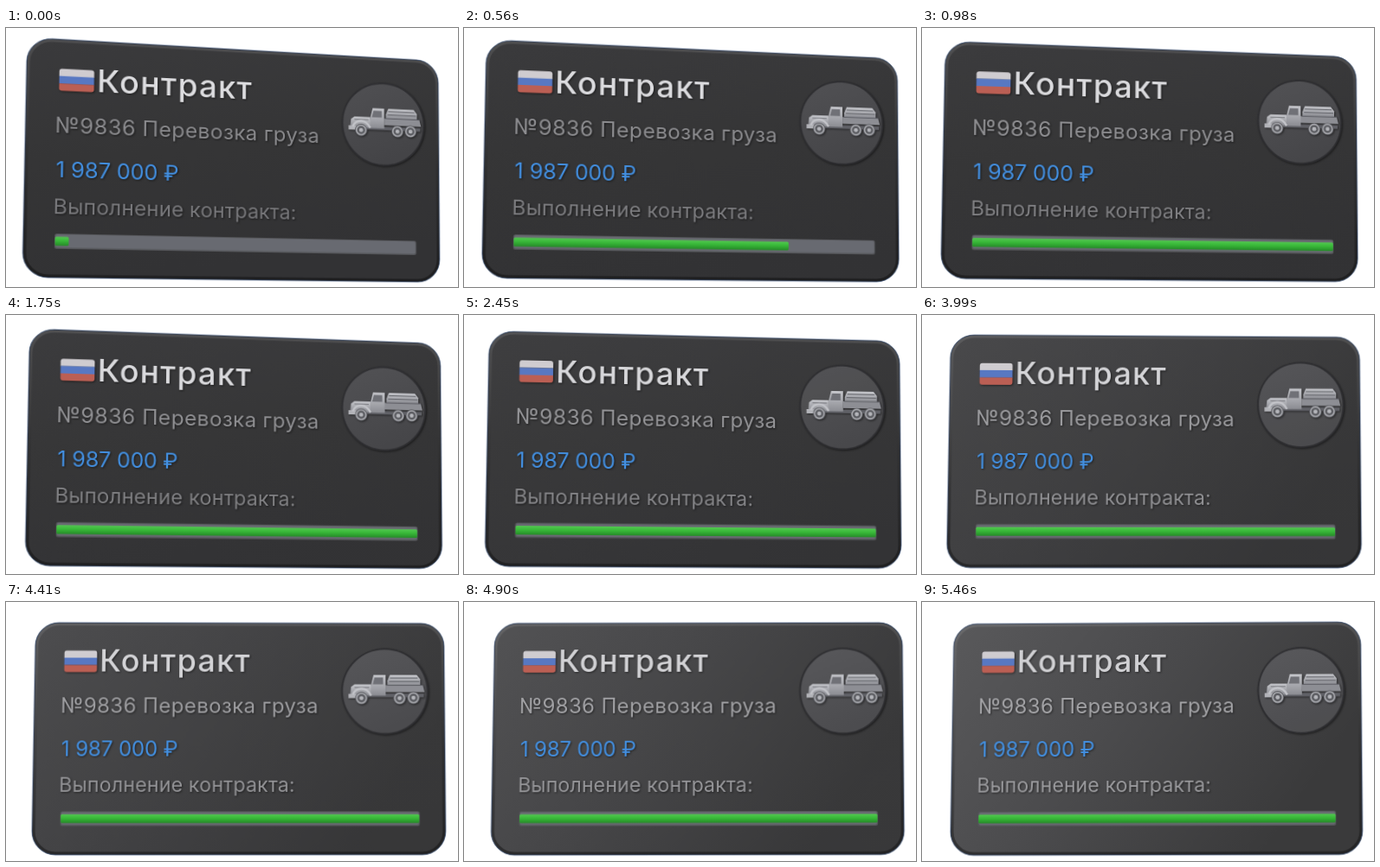
Write an HTML page that moves like this. It is 522 px wide and 300 px high and loops after 8000 ms.

```html
<!DOCTYPE html>
<html lang="ru">
<head>
<meta charset="utf-8">
<style>
  html, body { margin: 0; width: 100%; height: 100%; overflow: hidden; background: #fff; }
  #card { position: absolute; left: 0; top: 0; width: 472px; height: 268px; overflow: visible; transform-origin: 0 0; }
  text { font-family: Inter, "Open Sans", sans-serif; }
  .raised { filter: drop-shadow(1px 1.5px 1px rgba(0, 0, 0, .5)); }
</style>
</head>
<body>
<svg id="card" viewBox="0 0 472 268">
  <defs>
    <linearGradient id="base" x2=".2" y2="1">
      <stop offset="0" stop-color="#3a3a3c"/>
      <stop offset=".5" stop-color="#353536"/>
      <stop offset="1" stop-color="#323234"/>
    </linearGradient>
    <linearGradient id="lit" x2="1" y2=".4">
      <stop offset="0" stop-color="#59595b"/>
      <stop offset=".45" stop-color="#4c4c4e"/>
      <stop offset="1" stop-color="#3a3a3b"/>
    </linearGradient>
    <linearGradient id="rim" x2="0" y2="1">
      <stop offset="0" stop-color="#fff" stop-opacity=".1"/>
      <stop offset=".5" stop-color="#000" stop-opacity=".1"/>
      <stop offset="1" stop-color="#000" stop-opacity=".4"/>
    </linearGradient>
    <linearGradient id="disc" x2=".4" y2="1">
      <stop offset="0" stop-color="#505053"/>
      <stop offset="1" stop-color="#444447"/>
    </linearGradient>
    <linearGradient id="green" x2="0" y2="1">
      <stop offset="0" stop-color="#52c850"/>
      <stop offset=".45" stop-color="#38b838"/>
      <stop offset="1" stop-color="#258a28"/>
    </linearGradient>
    <linearGradient id="metal" x2="0" y2="1">
      <stop offset="0" stop-color="#c6c7cc"/>
      <stop offset="1" stop-color="#8b8c92"/>
    </linearGradient>
    <clipPath id="flag"><rect x="33.4" y="32.4" width="37.6" height="25.2" rx="3"/></clipPath>
    <g id="wheel">
      <circle r="7.3" fill="#5c5d62"/>
      <circle r="5.6" fill="none" stroke="#a6a7ac" stroke-width="1.6"/>
      <circle r="2.4" fill="#b3b4b9"/>
    </g>
  </defs>

  <rect width="472" height="268" rx="27" fill="url(#base)"/>
  <rect id="light" width="472" height="268" rx="27" fill="url(#lit)"/>
  <rect x="2" y="2" width="468" height="264" rx="25" fill="none" stroke="url(#rim)" stroke-width="3"/>
  <rect width="472" height="268" rx="27" fill="none" stroke="#28436d" stroke-opacity=".7"/>

  <g id="content">
    <g class="raised"><g clip-path="url(#flag)">
      <path d="M32 32h40v9H32z" fill="#cfccd0"/>
      <path d="M32 40.8h40v8.6H32z" fill="#5878c2"/>
      <path d="M32 49.2h40v9H32z" fill="#bb5f54"/>
    </g></g>

    <g class="raised">
      <text id="title" x="74" y="57" font-size="36" font-weight="500" letter-spacing="1.2">Контракт</text>
      <text id="job" x="29.8" y="105" font-size="24" letter-spacing=".35">№9836 Перевозка груза</text>
      <text x="31.5" y="155" font-size="24" letter-spacing="-.2" fill="#4390e2">1 987 000 ₽</text>
      <text id="label" x="29.5" y="196" font-size="23" letter-spacing=".15">Выполнение контракта:</text>
    </g>

    <rect x="31.5" y="218" width="410.5" height="17" rx="2.5" fill="#55565a"/>
    <rect x="32.5" y="219" width="408.5" height="14.5" rx="2" fill="#686a71"/>
    <rect id="bar" x="32" y="221.5" height="10" rx="1.5" fill="url(#green)"/>

    <g transform="translate(402.8 79.4)">
      <circle class="raised" r="50.3" fill="#303033"/>
      <circle r="49.3" fill="url(#disc)"/>
      <circle id="glow" r="49.3" fill="#fff"/>
      <circle r="49" fill="none" stroke="#29292b" stroke-opacity=".7" stroke-width="1.5"/>
      <g class="raised">
        <path d="M-41 3h86v4h-86z" fill="#606167"/>
        <path d="M1-7h43l2 8H1z" fill="#8d8e94"/>
        <path d="M3-12 6-19H37l4 5v7H3z" fill="url(#metal)"/>
        <path d="M6-15.5H38M5-11.5H40M2-7H44" stroke="#5e5f65" fill="none"/>
        <path d="M-16-7-13-19H1V5H-17z" fill="url(#metal)"/>
        <path d="M-12-16h10v8h-12z" fill="#707177"/>
        <path d="M-39-5-35-8-16-8V5H-40z" fill="url(#metal)"/>
        <path d="M-35-4.5h17" stroke="#74757b" fill="none"/>
        <path d="M-42 3h9v5h-9z" fill="#b2b3b8"/>
        <path d="M-37 4Q-34-3-27-3T-16 5" stroke="#c2c3c8" stroke-width="2.5" fill="none"/>
        <use href="#wheel" x="-27" y="8"/>
        <use href="#wheel" x="17" y="8"/>
        <use href="#wheel" x="33" y="7.5"/>
      </g>
    </g>
  </g>
</svg>
<script>
  const LOOP = 8000, STEP = 70, PAUSE_AT = 1050, RESUME_AT = 1750, TURN = 4830;
  const WIDTH = 472, HEIGHT = 268;
  const $ = id => document.getElementById(id);
  const mix = (a, b, k) => a + (b - a) * k;
  const clamp = x => Math.max(0, Math.min(1, x));
  const gray = (a, b, k) => { const v = Math.round(mix(a, b, k)); return `rgb(${v},${v},${v + 3})`; };

  // Projective transform from the flat card to four corners, clockwise from top left.
  function project([[x0, y0], [x1, y1], [x2, y2], [x3, y3]]) {
    const ax = x1 - x2, ay = y1 - y2, bx = x3 - x2, by = y3 - y2;
    const sx = x0 - x1 + x2 - x3, sy = y0 - y1 + y2 - y3;
    const den = ax * by - bx * ay;
    const g = (sx * by - bx * sy) / den, h = (ax * sy - sx * ay) / den;
    const col = (x, y, w, size) => [(x - x0 + w * x) / size, (y - y0 + w * y) / size, 0, w / size];
    return `matrix3d(${[...col(x1, y1, g, WIDTH), ...col(x3, y3, h, HEIGHT), 0, 0, 1, 0, x0, y0, 0, 1]})`;
  }

  function draw(time) {
    let t = Math.floor(time % LOOP / STEP) * STEP;
    const fill = clamp((t + 113) / 998);
    if (t >= RESUME_AT) t -= RESUME_AT - PAUSE_AT - STEP;
    else t = Math.min(t, PAUSE_AT);
    const u = clamp(t / TURN), eased = u * (1.6 - .6 * u);

    $('card').style.transform = project([
      [mix(24.5, 37, u), mix(10.8, 25.5, eased)],
      [mix(499, 506.5, eased), mix(38.3, 23, eased)],
      [mix(501, 509, eased), mix(294.5, 292.5, eased)],
      [mix(18.8, 32.5, u), mix(288.8, 293.5, eased)]
    ]);
    $('content').setAttribute('transform', `translate(${1.5 * (1 - u)} ${1 - u})`);
    $('light').setAttribute('opacity', u * u);
    $('glow').setAttribute('opacity', .05 * u);
    $('title').setAttribute('fill', gray(220, 208, u));
    $('job').setAttribute('fill', gray(138, 164, u));
    $('label').setAttribute('fill', gray(120, 154, u));
    $('bar').setAttribute('width', 409.5 * fill * fill * (3 - 2 * fill));
  }

  const start = performance.now();
  function tick() {
    draw(performance.now() - start);
    requestAnimationFrame(tick);
  }
  tick();
</script>
</body>
</html>
```
